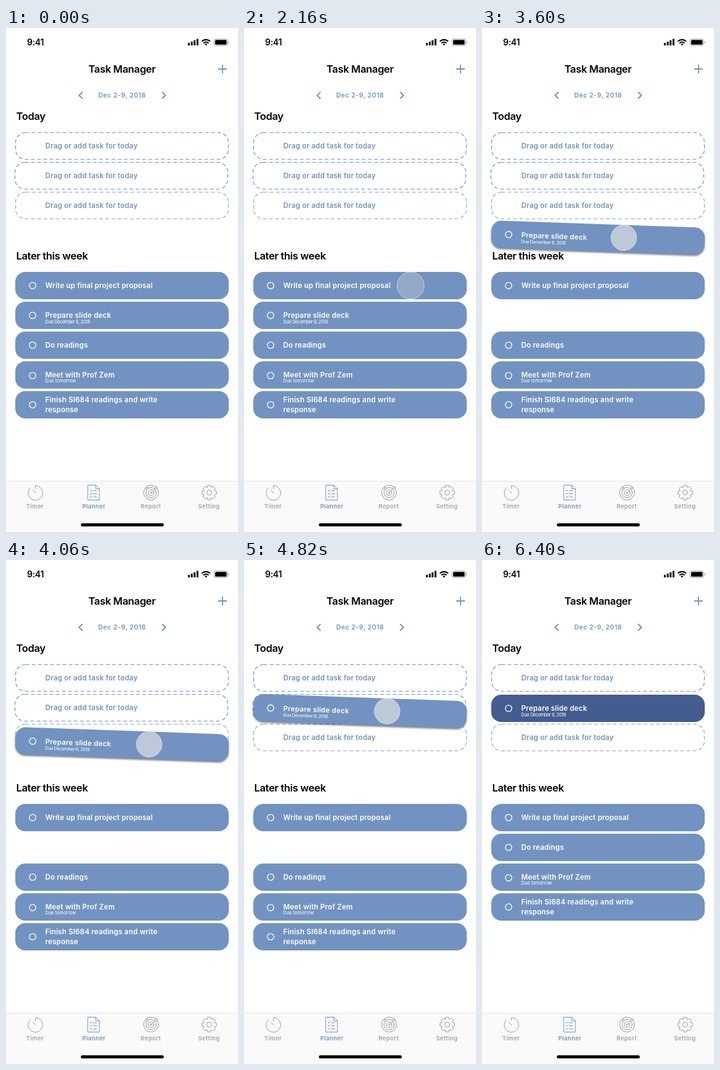
An HTML page for the animation above (7.82 s loop, 375x812 px).

```html
<!DOCTYPE html>
<html lang="en">
<head>
<meta charset="utf-8">
<title>Task Manager</title>
<style>
  html, body { margin: 0; width: 100%; height: 100%; overflow: hidden; background: #fff; }
  svg { display: block; width: 375px; height: 812px; font-family: Inter, Roboto, sans-serif; }
  .head { font-size: 16.5px; font-weight: 600; letter-spacing: -.35px; }
  .task { font-size: 11.5px; font-weight: 600; letter-spacing: .2px; }
  .due { font-size: 7.4px; }
  .tab { font-size: 9.5px; font-weight: 600; letter-spacing: .35px; text-anchor: middle; fill: #a3a3a3; }
  .line { fill: none; stroke: #9a9a9a; stroke-linecap: round; stroke-linejoin: round; }
  .blue { stroke: #7293c1; }
  .slot rect { fill: none; stroke: #7293c1; stroke-width: 1.2; stroke-dasharray: 6 4; }
  .slot text { fill: #7293c1; }
  .card { fill: #fff; }
  .card .box { fill: #7293c1; }
  .card circle { fill: none; stroke: #fff; stroke-width: 1.3; }
  .shadow { fill: #000; filter: blur(1.8px); }
</style>
</head>
<body>
<svg viewBox="0 0 375 812">
  <!-- status bar -->
  <text x="34" y="28" font-size="14" font-weight="600" letter-spacing="-.3">9:41</text>
  <path d="M294 24h3v4h-3zM298.7 22h3v6h-3zM303.3 19.8h3v8.2h-3zM308 17.5h3v10.5h-3z"/>
  <g fill="none" stroke="#000" stroke-width="2.1">
    <path d="M316.6 21.6a9.6 9.6 0 0 1 13.4 0M319.2 24.4a5.9 5.9 0 0 1 8.2 0"/>
  </g>
  <path d="M321.2 26.2a3 3 0 0 1 4.2 0l-2.1 2.1z"/>
  <rect x="336.5" y="17.8" width="21.5" height="10.4" rx="2.8" fill="none" stroke="#000" stroke-opacity=".4"/>
  <rect x="338" y="19.3" width="18.5" height="7.4" rx="1.5"/>
  <path d="M359.3 21.2a2 2 0 0 1 0 3.8z" opacity=".4"/>

  <!-- header -->
  <text class="head" x="187.5" y="72" text-anchor="middle">Task Manager</text>
  <path class="line blue" stroke-width="1.8" style="stroke-linecap:butt" d="M343 66h14M350 59v14"/>
  <path class="line blue" stroke-width="2" d="M123.2 103.6l-5 4.9 5 4.9M252.8 103.6l5 4.9-5 4.9"/>
  <text x="149" y="112" font-size="10.5" font-weight="600" letter-spacing=".5" fill="#7293c1">Dec 2-9, 2018</text>
  <text class="head" x="16.5" y="148">Today</text>
  <text class="head" x="16.5" y="373">Later this week</text>

  <g id="slots"></g>
  <g id="cards"></g>
  <circle id="cursor"/>

  <!-- tab bar -->
  <rect y="730" width="375" height="82" fill="#fafafa"/>
  <rect y="729.5" width="375" height="1.5" fill="#ebebeb"/>
  <path class="line" d="M47.5 742v-4.7a11.7 11.7 0 1 1-8.4 3.6M43.5 744.5l4.5 4.8"/>
  <g class="line blue">
    <path d="M132.5 736.5h12.5l6 6v18h-18.5zM145 736.5v6h6"/>
    <path d="M136 745l1.2 1.2 2-2.2M136 750l1.2 1.2 2-2.2M136 755l1.2 1.2 2-2.2M141.5 745.5h5M141.5 750.5h5M141.5 755.5h5"/>
  </g>
  <g class="line">
    <circle cx="234.5" cy="748.5" r="12"/>
    <circle cx="234.5" cy="748.5" r="8.3"/>
    <circle cx="234.5" cy="748.5" r="4.5"/>
    <path d="M234.5 748.5l7.6-7.6"/>
    <g fill="#fafafa">
      <circle cx="234.5" cy="748.5" r="1.3"/>
      <circle cx="228.3" cy="741.5" r="1.7"/>
      <circle cx="242.6" cy="740.4" r="1.7"/>
    </g>
    <path id="gear"/>
    <circle cx="328.5" cy="748.5" r="4"/>
  </g>
  <text class="tab" x="47" y="774">Timer</text>
  <text class="tab" x="142" y="774" style="fill:#7293c1">Planner</text>
  <text class="tab" x="234" y="774">Report</text>
  <text class="tab" x="328" y="774">Setting</text>
  <rect x="121" y="798" width="134" height="5" rx="2.5"/>
</svg>

<script>
const LOOP = 7820;
const $ = id => document.getElementById(id);

// Static parts built from short lists
$('slots').innerHTML = [[15.5, 168.5, 1], [14.5, 216.5, 1], [15.5, 264.5, .8]].map(([x, y, o]) =>
  `<g class="slot"><rect x="${x}" y="${y}" width="344" height="43" rx="16" opacity="${o}"/>
   <text class="task" x="63.5" y="${y + 25.5}">Drag or add task for today</text></g>`).join('');

const card = (lines, { due = '', dueY = 35, gap = 0, top = 26, ring = 22 } = {}) =>
  `<g class="card"><rect class="shadow" x="15" y="2" width="345" height="44" rx="16" opacity="0"/>
   <rect class="box" x="15" width="345" height="44" rx="16"/><circle cx="43" cy="${ring}" r="5.2"/>
   ${lines.map((s, i) => `<text class="task" x="63.5" y="${top + 16 * i}">${s}</text>`).join('')}
   <text class="due" x="63.3" y="${dueY}" letter-spacing="${gap}">${due}</text></g>`;

$('cards').innerHTML = [
  card(['Write up final project proposal']),
  card(['Do readings']),
  card(['Meet with Prof Zem'], { due: 'Due tomorrow', dueY: 34, ring: 23 }),
  card(['Finish SI684 readings and write', 'response'], { top: 18 }),
  card(['Prepare slide deck'], { due: 'Due December 6, 2018', gap: -.37 })
].join('');

const gearPoints = [];
for (let tooth = 0; tooth < 8; tooth++)
  for (const [turn, r] of [[-.36, 9], [-.2, 12], [.2, 12], [.36, 9]]) {
    const a = tooth * Math.PI / 4 + turn;
    gearPoints.push(`${328.5 + r * Math.sin(a)} ${748.5 - r * Math.cos(a)}`);
  }
$('gear').setAttribute('d', `M${gearPoints.join('L')}Z`);

const [first, ...rest] = document.querySelectorAll('.card');
const dragged = rest.pop();
const shadow = dragged.querySelector('.shadow');
const box = dragged.querySelector('.box');
const middleSlot = document.querySelectorAll('.slot')[1];
const cursor = $('cursor');

// Easing and timing
const linear = p => p;
const easeIn = p => p * p;
const easeOut = p => p * (2 - p);
const easeInOut = p => p < .5 ? 4 * p ** 3 : 1 - 4 * (1 - p) ** 3;
const overshoot = p => easeOut(p) + 1.2 * p * p * (1 - p);
const clamp = p => Math.min(1, Math.max(0, p));
const part = (t, start, length, ease = linear) => ease(clamp((t - start) / length));
const mix = (a, b, p) => a + (b - a) * p;
const place = (el, y, angle = 0) =>
  el.setAttribute('transform', `translate(0 ${y}) rotate(${angle} 187.5 22)`);

function draw(t) {
  const lift = part(t, 3080, 600, easeIn);
  const tilt = part(t, 3080, 300);
  const hover = part(t, 4000, 820, easeInOut);
  const drop = part(t, 5060, 140);
  const settle = part(t, 5500, 350, easeOut);
  const leave = part(t, 6200, 200, easeIn);

  // Dragged card
  const held = 463 - 166 * lift - 53.5 * hover;
  place(dragged, held - 4.5 * drop - 22, 2 * tilt * (1 - drop));
  shadow.setAttribute('opacity', .5 * tilt * (1 - settle));
  box.style.fill = `rgb(${mix(114, 68, drop)},${mix(147, 92, drop)},${mix(193, 144, drop)})`;
  middleSlot.setAttribute('opacity', 1 - settle);

  // Remaining list closes the gap
  place(first, 393);
  rest.forEach((el, i) => place(el, 489 + 48 * (i - settle)));

  // Touch cursor
  let x, y;
  if (t < 2140) {
    const enter = part(t, 1380, 500, easeOut);
    x = mix(398, 273.5, enter);
    y = mix(328, 410.5, enter);
  } else if (t < 3080) {
    x = mix(273.5, 222.4, part(t, 2140, 500, easeOut));
    y = mix(410.5, 463, part(t, 2140, 500, overshoot));
  } else {
    x = mix(222.4 + 9 * lift + 16 * drop, 402, leave);
    y = mix(held, 213, leave);
  }
  const press = part(t, 2440, 200) * (1 - drop);
  const tone = mix(206, 228, press);
  const attrs = {
    cx: x, cy: y, r: 21.7 - press,
    fill: `rgba(${tone},${tone},${tone},${mix(.36, .66, press)})`,
    stroke: 'rgba(222,222,222,.85)',
    visibility: t > 1380 && t < 6400 ? 'visible' : 'hidden'
  };
  for (const name in attrs) cursor.setAttribute(name, attrs[name]);
}

function tick() {
  draw(performance.now() % LOOP);
  requestAnimationFrame(tick);
}
tick();
</script>
</body>
</html>
```
